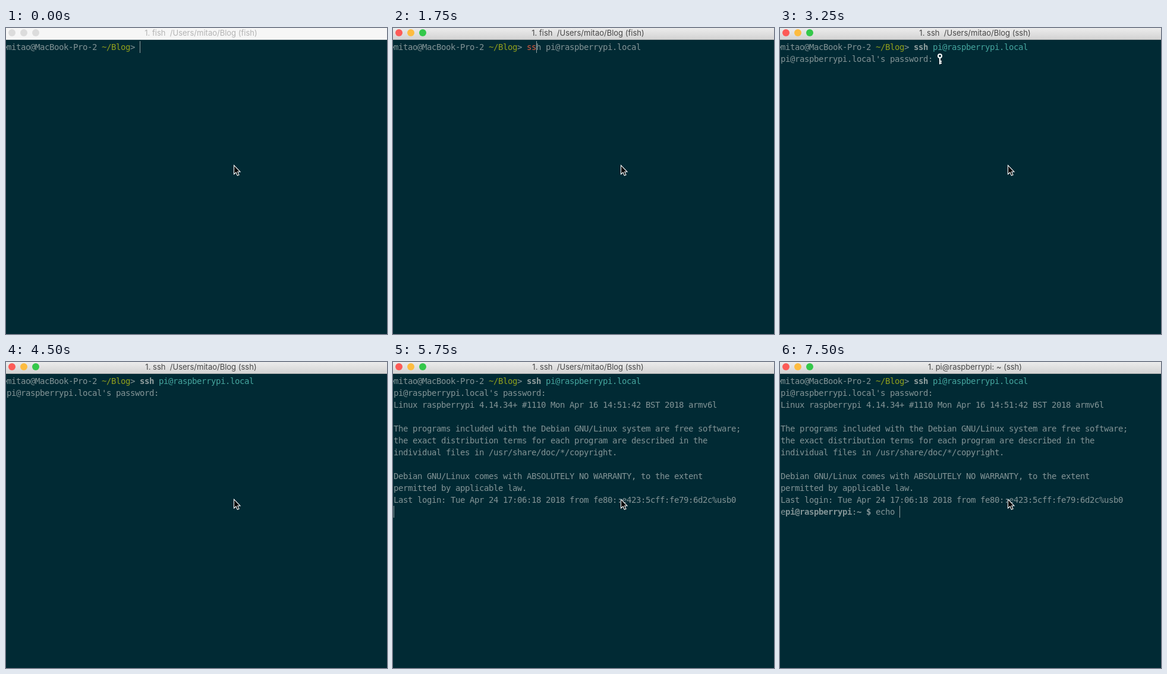
An HTML page with a canvas for the animation above (8 s loop, 641 by 515 pixels).

```html
<!DOCTYPE html>
<html lang="en">
<head>
<meta charset="utf-8">
<title>Terminal session</title>
<style>
  html, body { margin: 0; width: 100%; height: 100%; overflow: hidden; background: #012a34; }
  canvas { display: block; }
</style>
</head>
<body>
<canvas id="stage" width="641" height="515"></canvas>
<script>
const ctx = document.getElementById('stage').getContext('2d');
const LOOP = 8000, CELL = 8, ROW = 20, LEFT = 1, TOP = 22;
const GREY = '#839496', BRIGHT = '#93a1a1', GREEN = '#91a01c', CYAN = '#45a59e', RED = '#dc5c40';
const USER = 'mitao', HOST = 'pi@raspberrypi.local';
const WELCOME = `Linux raspberrypi 4.14.34+ #1110 Mon Apr 16 14:51:42 BST 2018 armv6l

The programs included with the Debian GNU/Linux system are free software;
the exact distribution terms for each program are described in the
individual files in /usr/share/doc/*/copyright.

Debian GNU/Linux comes with ABSOLUTELY NO WARRANTY, to the extent
permitted by applicable law.
Last login: Tue Apr 24 17:06:18 2018 from fe80::e423:5cff:fe79:6d2c%usb0`.split('\n');

// Each value holds from its start time until the next one.
const titles = [
  [0, `1. fish  /Users/${USER}/Blog (fish)`],
  [2500, `1. ssh  /Users/${USER}/Blog (fish)`],
  [3250, `1. ssh  /Users/${USER}/Blog (ssh)`],
  [6500, '1. pi@raspberrypi: ~ (ssh)']
];
const carets = [ // [time, column, row]; no column means hidden
  [0, 28, 0], [250], [750, 28, 0], [1250], [1750, 30, 0], [2250, 52, 0],
  [2500, 0, 1], [3000], [5000, 0, 2], [5500], [5750, 0, 11],
  [6250, 1, 11], [6500, 21, 11], [7250, 23, 11], [7500, 25, 11]
];
const commands = [
  [0],
  [1750, ['ss', RED], ['h ' + HOST, GREY]],
  [2250, ['ssh ', BRIGHT, true], [HOST, CYAN]]
];
const echoes = [[0, ''], [6500, 'e'], [7250, 'ech'], [7500, 'echo ']];
const at = (steps, t) => steps.findLast(s => s[0] <= t).slice(1);

// Draws coloured runs of text on the character grid.
function line(row, ...runs) {
  let col = 0;
  for (const [text, color = GREY, bold] of runs) {
    ctx.font = `${bold ? 'bold ' : ''}14px "DejaVu Sans Mono", monospace`;
    ctx.fillStyle = color;
    for (const ch of text) ctx.fillText(ch, LEFT + CELL * col++, TOP + ROW * row + 15);
  }
}

function disc(x, y, r, color) {
  ctx.fillStyle = color;
  ctx.beginPath();
  ctx.arc(x, y, r, 0, 7);
  ctx.fill();
}

function titleBar(t) {
  const active = t >= 250;
  const shade = ctx.createLinearGradient(0, 0, 0, 19);
  shade.addColorStop(0, active ? '#ececec' : '#f6f6f6');
  shade.addColorStop(1, active ? '#d3d3d3' : '#f6f6f6');
  ctx.fillStyle = shade;
  ctx.fillRect(0, 0, 641, 19);
  ctx.fillStyle = active ? '#b4b4b4' : '#d8dbdc';
  ctx.fillRect(0, 19, 641, 1);
  ['#fc5b57', '#fdbc40', '#34c84a'].forEach((c, i) => disc(10 + 20 * i, 8, 6, active ? c : '#dcdcdc'));
  ctx.font = '13px Inter, sans-serif';
  ctx.textAlign = 'center';
  ctx.fillStyle = active ? '#464646' : '#b3b3b3';
  ctx.fillText(at(titles, t)[0], 328, 13);
  ctx.textAlign = 'left';
}

function key() {
  ctx.strokeStyle = ctx.fillStyle = '#fff';
  ctx.lineWidth = 2;
  ctx.beginPath();
  ctx.arc(269, 47, 3, 0, 7);
  ctx.stroke();
  ctx.fillRect(268, 50, 2, 11);
  ctx.fillRect(270, 55, 2, 2);
  ctx.fillRect(270, 58, 2, 2);
}

function pointer() {
  const arrow = new Path2D('M383.5 231V246L387 243 389.3 248.3 392 247.2 389.7 242H394Z');
  ctx.fillStyle = '#000';
  ctx.fill(arrow);
  ctx.strokeStyle = '#fff';
  ctx.lineWidth = 1.1;
  ctx.stroke(arrow);
}

function draw(t) {
  ctx.fillStyle = '#012a34';
  ctx.fillRect(0, 0, 641, 515);
  titleBar(t);

  ctx.fillStyle = GREY;
  ctx.fillRect(0, 31, 1, 3);
  line(0, [USER + '@MacBook-Pro-2 '], ['~/Blog', GREEN], ['> '], ...at(commands, t));
  if (t >= 3000) line(1, [HOST + "'s password: "]);
  if (t >= 3000 && t < 4500) key();
  if (t >= 5750) WELCOME.forEach((text, i) => line(2 + i, [text]));
  if (t >= 6250) line(11, ['e']);
  if (t >= 6500) line(11, [' '], ['pi@raspberrypi', GREY, true], [':'], ['~ $ ', GREY, true], at(echoes, t));

  const [col, row] = at(carets, t);
  if (col !== undefined) {
    ctx.fillStyle = BRIGHT;
    ctx.fillRect(LEFT + CELL * col, TOP + ROW * row, 1, ROW);
  }
  pointer();
}

let start;
function tick(now) {
  start ??= now;
  draw((now - start) % LOOP);
  requestAnimationFrame(tick);
}
requestAnimationFrame(tick);
</script>
</body>
</html>
```
